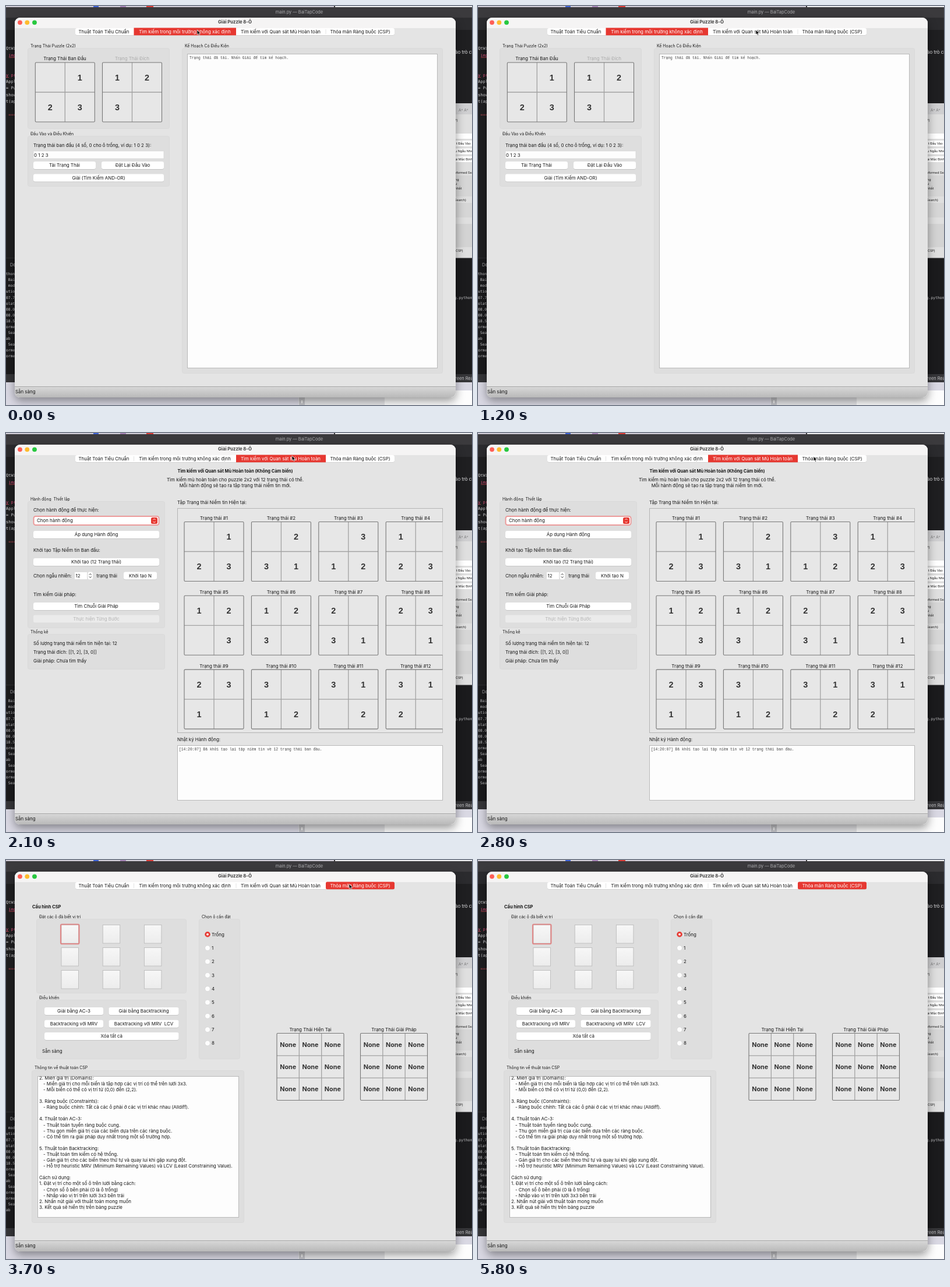
An HTML page that plays this animation: 800 px wide and 685 px high, repeating every 5.9 s.

```html
<!DOCTYPE html>
<html lang="vi">
<head>
<meta charset="utf-8">
<title>Giải Puzzle 8-Ô</title>
<style>
html, body { margin: 0; width: 100%; height: 100%; overflow: hidden; background: #1e1e20; }
svg { display: block; width: 800px; height: 685px; }
text { font-family: Inter, "Open Sans", sans-serif; white-space: pre; }
.mono { font-family: "Liberation Mono", monospace; }
.code { font-family: "DejaVu Sans Mono", monospace; }
.num { font-family: "Liberation Sans", sans-serif; }
</style>
</head>
<body>
<svg id="stage" viewBox="0 0 800 685" xmlns="http://www.w3.org/2000/svg"></svg>
<script>
const LOOP = 5900;
const INK = '#161616', RED = '#e63831';

const rect = (x, y, w, h, fill, more = '') =>
  `<rect x="${x}" y="${y}" width="${w}" height="${h}" fill="${fill}" ${more}/>`;

// y is the optical middle of the line
const text = (x, y, str, { size = 7.9, fill = INK, anchor = 'start', weight = 400, cls = '' } = {}) =>
  `<text x="${x}" y="${(y + size * 0.36).toFixed(2)}" font-size="${size}" fill="${fill}" ` +
  `text-anchor="${anchor}" font-weight="${weight}" class="${cls}">${str}</text>`;

const mid = (x, y, str, o = {}) => text(x, y, str, { ...o, anchor: 'middle' });
const list = (rows, draw) => rows.map(draw).join('');

const group = (title, tx, ty, x, y, w, h) =>
  text(tx, ty, title, { size: 6.9 }) +
  rect(x + .5, y + .5, w - 1, h - 1, '#dedede', 'rx="3" stroke="#d9d9d9"');

const button = (x, y, w, label, off = false) =>
  (off ? '' : rect(x, y + .7, w, 13, '#bdbdbd', 'rx="3"')) +
  rect(x, y, w, 13, off ? '#ebebeb' : '#fff', 'rx="3"') +
  mid(x + w / 2, y + 6.5, label, { fill: off ? '#b4b4b4' : INK });

const field = (x, y, w, h) => rect(x + .5, y + .5, w - 1, h - 1, '#fdfdfd', 'stroke="#b9b9b9"');

function board(x, y, size, n, cells, font) {
  const step = size / n;
  let s = rect(x, y, size, size, '#e7e7e7', 'rx="1"');
  for (let i = 1; i < n; i++) {
    const d = i * step;
    s += `<path d="M${x + d} ${y}v${size}M${x} ${y + d}h${size}" stroke="#a2a2a2" stroke-width="1.3"/>`;
  }
  s += rect(x, y, size, size, 'none', 'rx="1.5" stroke="#777" stroke-width="1.1"');
  cells.forEach((c, i) => {
    if (c === '0') return;
    s += mid(x + (i % n + .5) * step, y + (Math.floor(i / n) + .5) * step, c,
      { fill: '#333', weight: 700, ...font });
  });
  return s;
}
const puzzle = (x, y, code) => board(x, y, 102, 2, [...code], { size: 14.4, cls: 'num' });

const TABS = [
  [119, 219.5, 168, 'Thuật Toán Tiêu Chuẩn'],
  [219.5, 395, 307, 'Tìm kiếm trong môi trường không xác định'],
  [395, 549, 471.5, 'Tìm kiếm với Quan sát Mù Hoàn toàn'],
  [549, 667, 608, 'Thỏa mãn Ràng buộc (CSP)']
];
const tabs = active =>
  rect(119, 38.6, 548, 12, '#c4c4c4', 'rx="3"') +
  rect(119, 38, 548, 12, '#fff', 'rx="3"') +
  list(TABS, ([a, b, c, label], i) =>
    (i === active ? rect(a, 37.5, b - a, 12.8, RED, i === 3 ? 'rx="2.5"' : '') : '') +
    (i && i !== active && i !== active + 1 ? rect(a - .4, 40, .8, 8, '#dcdcdc') : '') +
    mid(c, 44, label, { fill: i === active ? '#fff' : INK }));

function desktop() {
  const code = [
    [72, 'QtWi', '#d6d6d8'], [84, ' imp', '#e0527c'], [118, 'y pr', '#e0527c'], [129, 'Appl', '#d6d6d8'],
    [140, '= Pu', '#d6d6d8'], [152, 'show', '#d6d6d8'], [163, 't(ap', '#d6d6d8'], [186, ' ===', '#b8474f']
  ];
  const log = ['thon', ' Bai', ' mod', 'ution', '07.7', 'olat', '08.0', '08.0', '18.5', 'orme',
    ' Sea', 'ab', ' Sea', 'orme', 'orme', ' Sea', 'ab'];
  const side = [
    [770, 196, 'P)'], [773, 236, 't Đầu Vào'], [771, 249.5, 'u Ngẫu Nhiên'], [771, 263, 'ại Mặc Định'],
    [770, 286, 'nformed Search'], [771, 298, 'ng'], [771, 305.5, 'u'], [771, 313, 'nhất'],
    [770, 333, 'Search)'], [770, 420, '(CSP)']
  ];
  return rect(0, 0, 800, 685, '#d9d8e3') +
    rect(0, 0, 565, 2, '#d2ced8') + rect(565, 0, 235, 2, '#eeeef0') +
    rect(150, 0, 9, 2, '#3d62d8') + rect(196, 0, 10, 2, '#a884b8') + rect(241, 0, 12, 2, '#dc3b36') +
    rect(563, 0, 2, 2, '#333') +
    rect(0, 2, 800, 644, '#1f1f21') + rect(0, 2, 800, 18, '#3b3a3d') + rect(0, 20, 800, 21, '#2b2b2e') +
    mid(503.5, 10.5, 'main.py — BaiTapCode', { size: 7.4, fill: '#adadb0' }) +
    list(code, ([y, s, fill]) => text(0, y, s, { size: 7, fill, cls: 'code' })) +
    rect(5, 88, 10, .8, '#c0434f') + rect(0, 122, 5, .8, '#c0434f') +
    text(771, 79, 'ào trò chơi', { fill: '#e3e3e5' }) +
    rect(772, 167, 28, 266, '#dfdfdf') + rect(772, 167, 28, 19, '#cfcfd1') +
    text(777, 179, 'A˄ A˅', { size: 6.5, fill: '#777' }) +
    rect(772, 219, 28, 9, '#fff') + rect(772, 231, 28, 10, '#fff') +
    rect(772, 244.5, 28, 10, '#fff') + rect(772, 258, 28, 10, '#fff') +
    rect(772, 291, 28, 36, '#d6d6d6') + rect(772, 338, 28, 25, '#d6d6d6') + rect(772, 374, 28, 40, '#d3d3d3') +
    list(side, ([x, y, s]) => text(x, y, s, { size: 5.4 })) +
    rect(0, 432.5, 800, 1, '#38383b') + rect(0, 433.5, 800, 200, '#1b1b1d') +
    text(7, 444, 'Debug', { size: 7.4, fill: '#a9a9ab' }) +
    '<g clip-path="url(#logClip)"><g id="log">' +
    list(log, (s, i) => text(0, 460 + i * 10.07, s, { size: 6.3, fill: '#c9c9cb', cls: 'code' })) +
    text(770, 500.3, 'g.python', { size: 6.3, fill: '#c9c9cb', cls: 'code' }) + '</g></g>' +
    rect(0, 632, 800, 14, '#363639') +
    text(771, 639, 'reen Reader', { size: 7.4, fill: '#c4c4c6' }) +
    rect(502, 660, 148, 25, '#e6e6e8') + rect(503, 672, 10, 13, '#c4c4c8') +
    rect(507, 677, 2, 5, '#f4f4f4') + rect(650, 660, 150, 25, '#fdfdfd');
}

const windowFrame = () =>
  rect(15, 20, 757, 652, '#e4e4e4', 'rx="9" filter="url(#shadow)"') +
  '<path d="M15 38V29a9 9 0 0 1 9-9H763a9 9 0 0 1 9 9V38z" fill="#f5f4f4"/>' +
  '<path d="M15 653.5H772V663a9 9 0 0 1-9 9H24a9 9 0 0 1-9-9z" fill="url(#bar)"/>' +
  rect(15, 653, 757, 1, '#a5a5a5') +
  list([[24, '#fe5f57'], [36.3, '#febc2e'], [49, '#28c840']], ([x, c]) =>
    `<circle cx="${x}" cy="28.3" r="3.9" fill="${c}"/>`) +
  mid(393, 27.5, 'Giải Puzzle 8-Ô', { size: 7.7, weight: 700, fill: '#3d3d3d' }) +
  text(16, 662.5, 'Sẵn sàng');

const sceneAndOr = () => tabs(1) +
  group('Trạng Thái Puzzle (2x2)', 42, 68.5, 37, 72, 244, 139) +
  mid(101, 90.5, 'Trạng Thái Ban Đầu') + mid(216.5, 90.5, 'Trạng Thái Đích', { fill: '#ababab' }) +
  puzzle(50.3, 97, '0123') + puzzle(165.5, 97, '1230') +
  group('Đầu Vào và Điều Khiển', 42, 219.5, 37, 223, 244, 87) +
  text(47, 239, 'Trạng thái ban đầu (4 số, 0 cho ô trống, ví dụ: 1 0 2 3):') +
  rect(47, 249, 224, 13, '#fdfdfd', 'stroke="#cfcfcf" stroke-width=".6"') + text(48, 256, '0 1 2 3') +
  button(47, 267, 107, 'Tải Trạng Thái') + button(164, 267, 107, 'Đặt Lại Đầu Vào') +
  button(47, 288.5, 224, 'Giải (Tìm Kiếm AND-OR)') +
  group('Kế Hoạch Có Điều Kiện', 307, 68.5, 302, 72, 448, 559) +
  field(311, 82, 430, 540) +
  text(315, 88.5, 'Trạng thái đã tải. Nhấn Giải để tìm kế hoạch.', { size: 6.3, fill: '#444', cls: 'mono' });

function sceneBlind() {
  const states = '0123 0231 0312 1023 1203 1230 2031 2301 2310 3012 3102 3120'.split(' ');
  const arrows = (x, y, c) =>
    `<path d="M${x - 2} ${y - 1.4}l2-2 2 2M${x - 2} ${y + 1.4}l2 2 2-2" fill="none" stroke="${c}" stroke-width="1"/>`;
  return tabs(2) +
    mid(393.5, 65.5, 'Tìm kiếm với Quan sát Mù Hoàn toàn (Không Cảm biến)', { size: 7.4, weight: 700 }) +
    mid(393.5, 80.5, 'Tìm kiếm mù hoàn toàn cho puzzle 2x2 với 12 trạng thái có thể.') +
    mid(393.5, 90.5, 'Mỗi hành động sẽ tạo ra tập trạng thái niềm tin mới.') +
    group('Hành động  Thiết lập', 42, 114, 37, 117, 236, 218) +
    text(47, 132.5, 'Chọn hành động để thực hiện:') +
    rect(47.5, 143, 215, 15, '#fff', 'rx="3.5" stroke="#eb9a9a" stroke-width="2"') +
    text(53, 150.5, 'Chọn hành động') +
    rect(249, 145, 11, 11, RED, 'rx="2.5"') + arrows(254.5, 150.5, '#fff') +
    button(47, 168, 216, 'Áp dụng Hành động') +
    text(47, 201, 'Khởi tạo Tập Niềm tin Ban đầu:') +
    button(47, 215, 216, 'Khởi tạo (12 Trạng thái)') +
    text(47, 245, 'Chọn ngẫu nhiên:') +
    rect(118, 239, 21, 12, '#fff') + text(119.5, 245.5, '12') +
    rect(140.5, 238.5, 8.5, 13, '#fff', 'rx="3"') + arrows(144.7, 245, '#333') +
    text(155.5, 245, 'trạng thái') + button(202, 238.5, 57, 'Khởi tạo N') +
    text(47, 277.5, 'Tìm kiếm Giải pháp:') +
    button(47, 291, 216, 'Tìm Chuỗi Giải Pháp') + button(47, 312.5, 216, 'Thực hiện Từng Bước', true) +
    group('Thống kê', 42, 342, 37, 345, 236, 61) +
    text(47, 361, 'Số lượng trạng thái niềm tin hiện tại: 12') +
    text(47, 376.5, 'Trạng thái đích: [[1, 2], [3, 0]]') +
    text(47, 391.5, 'Giải pháp: Chưa tìm thấy') +
    text(294, 119.5, 'Tập Trạng thái Niềm tin Hiện tại:') +
    rect(294.5, 129.5, 455, 385, '#e6e6e6', 'stroke="#b4b4b4"') +
    '<g clip-path="url(#areaClip)">' +
    list(states, (code, i) => {
      const x = 306 + i % 4 * 115.4, y = 152.5 + Math.floor(i / 4) * 126.8;
      return mid(x + 51, y - 6, `Trạng thái #${i + 1}`) + puzzle(x, y, code);
    }) + '</g>' +
    text(294, 526.5, 'Nhật ký Hành động:') + field(294, 536, 456, 95) +
    text(297, 543, '[14:20:07] Đã khởi tạo lại tập niềm tin về 12 trạng thái ban đầu.',
      { size: 6.3, fill: '#444', cls: 'mono' });
}

function sceneCsp() {
  const notes = `2. Miền giá trị (Domains):
- Miền giá trị cho mỗi biến là tập hợp các vị trí có thể trên lưới 3x3.
- Mỗi biến có thể có vị trí từ (0,0) đến (2,2).

3. Ràng buộc (Constraints):
- Ràng buộc chính: Tất cả các ô phải ở các vị trí khác nhau (Alldiff).

4. Thuật toán AC-3:
- Thuật toán tuyền ràng buộc cung.
- Thu gọn miền giá trị của các biến dựa trên các ràng buộc.
- Có thể tìm ra giải pháp duy nhất trong một số trường hợp.

5. Thuật toán Backtracking:
- Thuật toán tìm kiếm có hệ thống.
- Gán giá trị cho các biến theo thứ tự và quay lui khi gặp xung đột.
- Hỗ trợ heuristic MRV (Minimum Remaining Values) và LCV (Least Constraining Value).

Cách sử dụng:
1. Đặt vị trí cho một số ô trên lưới bằng cách:
- Chọn số ô bên phải (0 là ô trống)
- Nhấp vào vị trí trên lưới 3x3 bên trái
2. Nhấn nút giải với thuật toán mong muốn
3. Kết quả sẽ hiển thị trên bảng puzzle`.split('\n');
  const cells = [...Array(9).keys()];
  const none = x => board(x, 297.5, 115, 3, Array(9).fill('None'), { size: 10.8 });
  return tabs(3) +
    text(45, 80.5, 'Cấu hình CSP', { size: 7.5, weight: 700 }) +
    group('Đặt các ô đã biết vị trí', 57, 97.5, 52, 101, 258, 128) +
    list(cells, i => {
      const x = 95 + i % 3 * 71.2, y = 111.5 + Math.floor(i / 3) * 39;
      return rect(x, y, 29.5, 31.5, 'url(#cell)', 'stroke="#bcbcbc" stroke-width=".9"') +
        (i ? '' : rect(x - 1, y - 1, 31.5, 33.5, 'none', 'rx="2" stroke="#df8a8a" stroke-width="2.2"'));
    }) +
    group('Chọn ô cần đặt', 336, 97.5, 331, 101, 71, 241) +
    list(cells, i => {
      const y = 127.7 + i * 23.35;
      return `<circle cx="346" cy="${y}" r="4.4" fill="${i ? '#fdfdfd' : RED}" stroke="${i ? '#cfcfcf' : RED}" stroke-width=".6"/>` +
        (i ? '' : `<circle cx="346" cy="${y}" r="1.9" fill="#fff"/>`) +
        text(353, y, i || 'Trống');
    }) +
    group('Điều khiển', 57, 237, 52, 240, 258, 102) +
    button(66, 253, 101, 'Giải bằng AC-3') + button(176.5, 253, 120, 'Giải bằng Backtracking') +
    button(66, 274.7, 101, 'Backtracking với MRV') + button(176.5, 274.7, 120, 'Backtracking với MRV  LCV') +
    button(66, 296, 230.5, 'Xóa tất cả') + text(62, 328, 'Sẵn sàng') +
    group('Thông tin về thuật toán CSP', 49, 357, 44, 361, 365, 262) +
    field(54, 371, 346, 243) +
    '<g clip-path="url(#noteClip)">' +
    list(notes, (s, i) => text(s[0] === '-' ? 64 : 57, 374 + i * 10.09, s)) + '</g>' +
    mid(522.5, 291.5, 'Trạng Thái Hiện Tại') + mid(666, 291.5, 'Trạng Thái Giải Pháp') +
    none(465) + none(608.5);
}

const clip = (id, x, y, w, h) => `<clipPath id="${id}">${rect(x, y, w, h, '#000')}</clipPath>`;
const fade = (id, a, b) => `<linearGradient id="${id}" x2="0" y2="1">` +
  `<stop stop-color="${a}"/><stop offset="1" stop-color="${b}"/></linearGradient>`;

document.getElementById('stage').innerHTML =
  '<defs><filter id="shadow" x="-10%" y="-10%" width="120%" height="120%">' +
  '<feDropShadow dx="0" dy="6" stdDeviation="8" flood-opacity=".4"/></filter>' +
  fade('bar', '#d8d8d8', '#b9b9b9') + fade('cell', '#f7f7f7', '#ececec') +
  clip('logClip', 0, 455, 800, 152) + clip('areaClip', 295, 130, 454.5, 384) +
  clip('noteClip', 55, 371.5, 344, 241) + '</defs>' +
  desktop() + windowFrame() +
  list([sceneAndOr, sceneBlind, sceneCsp], (draw, i) => `<g id="scene${i}">${draw()}</g>`) +
  '<g id="cursor"><path d="M0 0V8.2L1.9 6.5L3.2 9.4L4.6 8.8L3.4 6H6z" fill="#0a0a0a" stroke="#fff" stroke-width=".7"/></g>';

// Keys are [ms, style, steps until the next key]
function play(id, keys) {
  const frames = keys.map(([ms, style, n = 1]) => ({ ...style, offset: ms / LOOP, easing: `steps(${n}, end)` }));
  frames.push({ ...keys[keys.length - 1][1], offset: 1 });
  document.getElementById(id).animate(frames, { duration: LOOP, iterations: Infinity });
}

const CUTS = [0, 1300, 3700];
CUTS.forEach((_, scene) => play(`scene${scene}`, CUTS.map((ms, i) => [ms, { opacity: i === scene ? 1 : 0 }])));
play('log', CUTS.map((ms, i) => [ms, { transform: `translate(0px, ${-10.07 * i}px)` }]));

const PATH = [
  [0, 328, 41], [300, 342, 41], [600, 400, 41], [900, 462, 41], [1200, 477, 41], [1800, 477, 41],
  [2100, 491, 39], [2400, 520, 39], [2800, 576, 40], [3000, 587, 41], [3600, 589, 41], [4500, 589, 41],
  [4800, 655, 28], [5100, 741, 5], [5200, 741, -20]
];
play('cursor', PATH.map(([ms, x, y], i) => {
  const next = PATH[i + 1];
  return [ms, { transform: `translate(${x}px, ${y}px)` }, next ? (next[0] - ms) / 100 : 1];
}));
</script>
</body>
</html>
```
